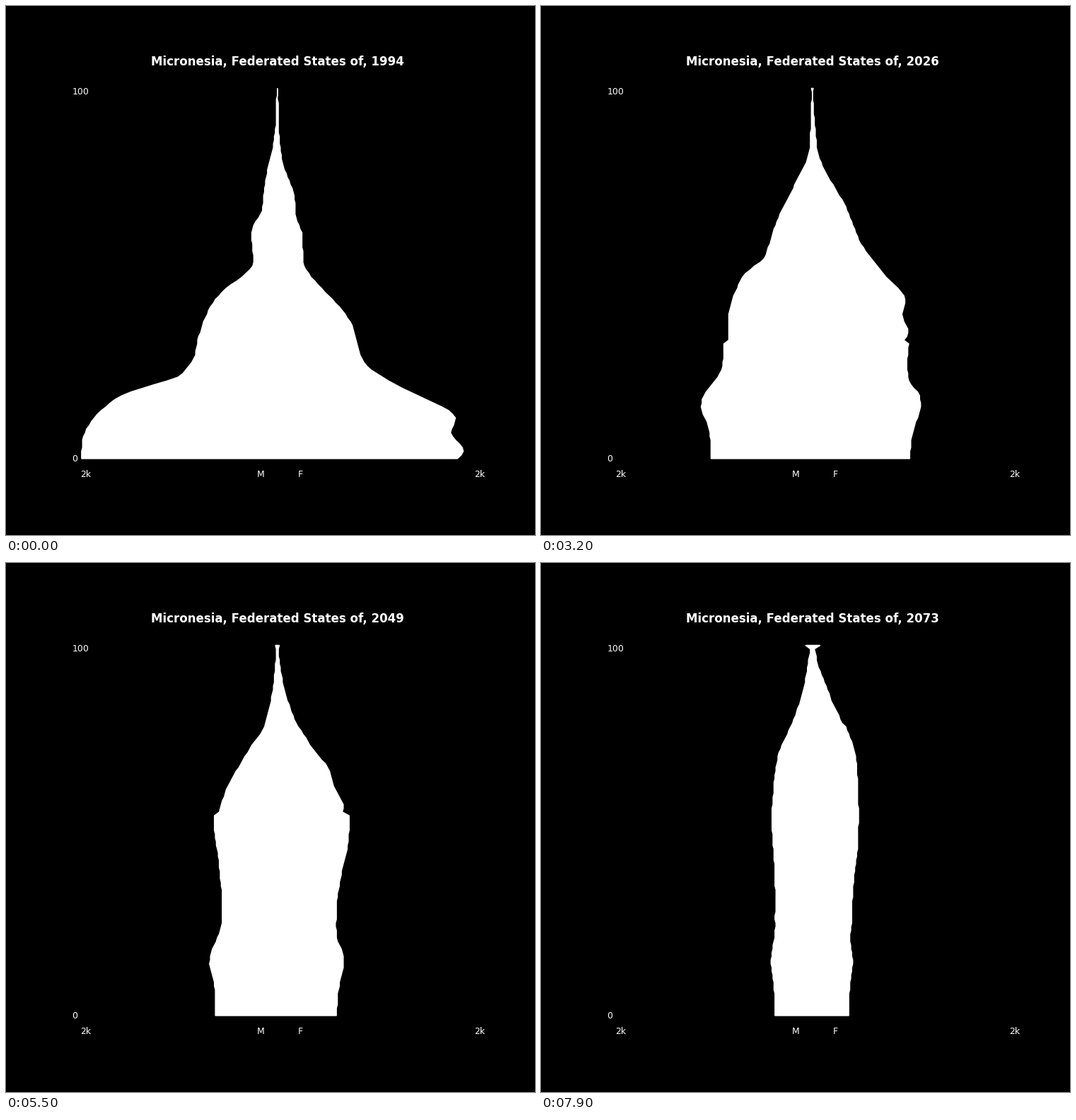
A matplotlib script that plays this animation: 748x748 px, repeating every 8 s.

```python
import numpy as np
import matplotlib.pyplot as plt
from matplotlib.animation import FuncAnimation
from matplotlib.patches import Polygon

SIZE, DPI = 748, 100
FRAMES, INTERVAL = 80, 100
FIRST_YEAR = 1994
PLACE = "Micronesia, Federated States of"
MID, BASE, STEP = 383.7, 640.0, 5.236   # centre x, y of age 0, pixels per year
TWO_K = 278.2                           # pixels for 2000 people
UNIT = TWO_K / 200                      # counts come in tens of people
AGES = np.arange(101)


def smooth(points):
    """Monotone cubic through {age: value}, sampled at whole ages."""
    x = np.array(list(points), float)
    y = np.array(list(points.values()), float)
    h = np.diff(x)
    d = np.diff(y) / h
    a, b = d[:-1], d[1:]
    same = a * b > 0
    inner = np.where(same, 2 * a * b / np.where(same, a + b, 1), 0)
    m = np.concatenate([d[:1], inner, d[-1:]])
    i = np.clip(np.searchsorted(x, AGES, side="right") - 1, 0, len(h) - 1)
    t = np.clip((AGES - x[i]) / h[i], 0, 1)
    return ((1 + 2 * t) * (1 - t) ** 2 * y[i] + t * (1 - t) ** 2 * h[i] * m[i]
            + t * t * (3 - 2 * t) * y[i + 1] + t * t * (t - 1) * h[i] * m[i + 1])


def linear(points):
    return np.interp(AGES, list(points), list(points.values()))


def births(t):
    """Half width at age 0, falling a little more slowly each year."""
    u = t - 10
    return 234 * np.exp(-0.0228 * u + 0.000018 * u * u)


def later_born(t, share, shape):
    """Cohorts born after the start: one shape by age, scaled by births."""
    lift = np.interp(AGES, [18, 26, 50], [0, 0.13, 0.055])
    late = np.clip((t - 42) / 37, 0, 1) ** 2
    return share * births(t) * shape * (1 + lift * late)


def simulate(start, loss, share, shape):
    """Half widths for every year; older cohorts climb one age per year."""
    old, years = start.copy(), []
    for t in range(FRAMES):
        years.append(np.where(AGES < t, later_born(t, share, shape), old))
        health = np.interp(t, [35, 65], [1, 0.66])
        left = old * np.exp(-loss * health)
        old = np.append(0, left[:-1])
        old[-1] += left[-1]
    return np.round(np.array(years) / UNIT) * UNIT


male = simulate(
    start=smooth({0: 277, 5: 275, 10: 263, 15: 236, 17: 220, 20: 174, 22: 141,
                  25: 125, 28: 116, 32: 112, 40: 97, 45: 78, 50: 44, 53: 33,
                  60: 36, 63: 33, 67: 21, 73: 18, 80: 11, 85: 5, 90: 2,
                  100: .4}),
    loss=linear({0: .018, 10: .014, 14: .02, 18: .043, 24: .043, 30: .022,
                 35: .014, 43: .013, 50: .024, 60: .045, 67: .058, 73: .082,
                 78: .125, 95: .15, 100: .3}),
    share=1,
    shape=smooth({0: 1, 5: 1.005, 9: 1.03, 14: 1.097, 17: 1.075, 21: .962,
                  25: .885, 29: .875, 41: .935, 53: 1.02, 60: .985, 70: .864,
                  79: .5}))

female = simulate(
    start=smooth({0: 255, 2: 263, 7: 245.5, 11: 251.5, 13: 241.5, 15: 221,
                  20: 167, 25: 127, 28: 116.5, 35: 107.5, 40: 92, 45: 67,
                  50: 44, 53: 36, 60: 35, 66: 25, 71: 24, 75: 16, 80: 7,
                  85: 3, 90: 1.3, 100: .4}),
    loss=linear({0: .016, 10: .0125, 14: .018, 18: .038, 23: .035, 27: .016,
                 33: .0125, 43: .0125, 50: .024, 58: .033, 67: .043, 73: .06,
                 78: .093, 85: .12, 100: .3}),
    share=0.961,
    shape=smooth({0: 1, 5: 1.015, 10: 1.065, 14: 1.113, 17: 1.1, 21: .995,
                  25: .975, 29: .982, 41: 1.1, 46: 1.175, 53: 1.21, 65: 1.18,
                  70: 1.135, 79: .85}))


fig = plt.figure(figsize=(SIZE / DPI, SIZE / DPI), dpi=DPI, facecolor="black")
ax = fig.add_axes([0, 0, 1, 1])
ax.set(xlim=(0, SIZE), ylim=(SIZE, 0))
ax.axis("off")
plt.rcParams["font.family"] = "DejaVu Sans"


def label(x, y, text, va="baseline"):
    ax.text(x, y, text, color="white", fontsize=9, va=va)


label(93.5, BASE - 99 * STEP, "100", "center")
label(93.5, BASE, "0", "center")
for x, text in ((-TWO_K, "2k"), (-29, "M"), (29, "F"), (TWO_K, "2k")):
    label(MID + x, 666, text)

title = ax.text(MID + 0.6, 84, "", color="white", fontsize=12, weight="bold",
                ha="center")
body = ax.add_patch(Polygon([(MID, BASE)] * 3, facecolor="white",
                            edgecolor="white", linewidth=1))
Y = BASE - STEP * AGES


def draw(i):
    left = np.column_stack([MID - male[i], Y])
    right = np.column_stack([MID + female[i], Y])
    body.set_xy(np.vstack([left, right[::-1]]))
    title.set_text(f"{PLACE}, {FIRST_YEAR + i}")
    return body, title


anim = FuncAnimation(fig, draw, frames=FRAMES, interval=INTERVAL,
                     repeat=True, repeat_delay=0)
plt.show()
```
